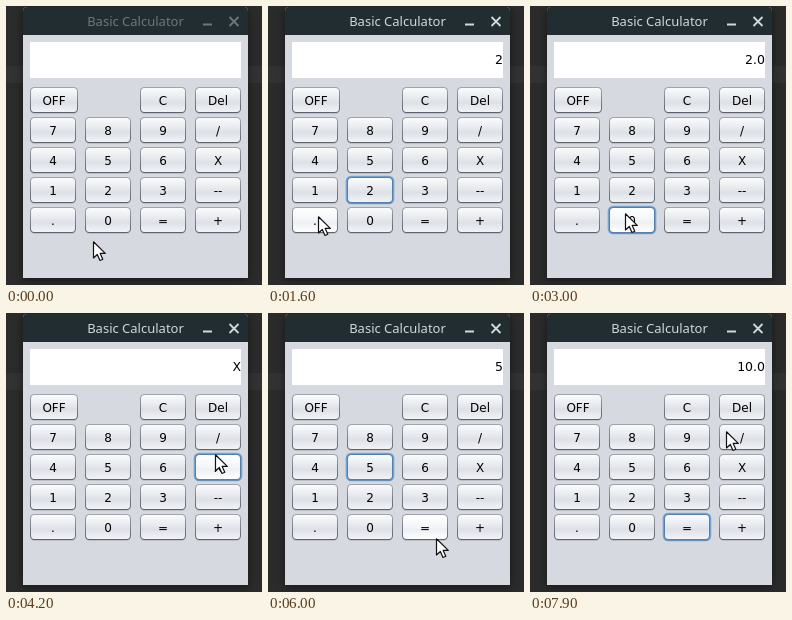
An HTML page that plays this animation: 256 by 279 pixels, repeating every 8000 ms.

```html
<!DOCTYPE html>
<html lang="en">
<head>
<meta charset="utf-8">
<title>Basic Calculator</title>
<style>
  html, body { margin: 0; width: 100%; height: 100%; overflow: hidden; background: #2b2b2b; }
  svg { display: block; width: 256px; height: 279px; }
  .label { font: 12px "DejaVu Sans", sans-serif; text-anchor: middle; }
  .display { font: 12.5px "DejaVu Sans", sans-serif; text-anchor: end; }
  .title { font: 500 13px "Noto Sans", sans-serif; text-anchor: middle; }
  .window { filter: drop-shadow(0 2px 4px rgba(0, 0, 0, .45)); }
</style>
</head>
<body>
<svg id="stage" viewBox="0 0 256 279">
  <defs>
    <linearGradient id="edge" x2="0" y2="1">
      <stop stop-color="#a0a4ad"/><stop offset="1" stop-color="#5c616b"/>
    </linearGradient>
    <linearGradient id="normal" x2="0" y2="1">
      <stop stop-color="#fafbfc"/><stop offset=".45" stop-color="#e6e8ed"/>
      <stop offset=".6" stop-color="#dde0e6"/><stop offset="1" stop-color="#f1f3f7"/>
    </linearGradient>
    <linearGradient id="hover" x2="0" y2="1">
      <stop stop-color="#ffffff"/><stop offset=".5" stop-color="#f3f5f8"/>
      <stop offset=".6" stop-color="#eceff3"/><stop offset="1" stop-color="#ffffff"/>
    </linearGradient>
    <linearGradient id="pressed" x2="0" y2="1">
      <stop stop-color="#a9b1bf"/><stop offset=".6" stop-color="#949eae"/>
      <stop offset="1" stop-color="#b3bbc9"/>
    </linearGradient>
  </defs>
  <rect width="256" height="279" fill="#2b2b2b"/>
  <rect y="60" width="256" height="17" fill="#323232"/>
  <g class="window">
    <path d="M17 272V5q0-4 4-4H238q4 0 4 4V272Z" fill="#d6d9df"/>
    <path d="M17 29V5q0-4 4-4H238q4 0 4 4V29Z" fill="#222d32"/>
  </g>
  <g id="caption">
    <text class="title" x="129.5" y="20">Basic Calculator</text>
    <path d="M197 18.5h9M223.5 11l9 9m0-9l-9 9" fill="none" stroke-width="1.8"/>
  </g>
  <rect x="24" y="36" width="211" height="36" fill="#fff"/>
  <text id="display" class="display" x="235" y="58"></text>
  <g id="keys"></g>
  <path id="cursor" d="M.5 .8V17L4.3 13.5 7 19.5 9.8 18.3 7.2 12.4H12.3Z" fill="#fff"
        stroke="#111" stroke-width="1.2" stroke-linejoin="round"/>
</svg>
<script>
const LOOP = 8000, STEP = 100;
const byId = id => document.getElementById(id);

function add(parent, tag, attrs, text = "") {
  const node = document.createElementNS("http://www.w3.org/2000/svg", tag);
  for (const name in attrs) node.setAttribute(name, attrs[name]);
  node.textContent = text;
  return parent.appendChild(node);
}

const rows = [["OFF", "", "C", "Del"], ["7", "8", "9", "/"], ["4", "5", "6", "X"],
  ["1", "2", "3", "--"], [".", "0", "=", "+"]];
const keys = [];
rows.forEach((row, r) => row.forEach((label, c) => {
  if (label) keys.push(makeKey(label, 24 + 55 * c, 81 + 30 * r, label === "OFF" ? 48 : 46));
}));

function makeKey(label, x, y, w, h = 26) {
  const group = add(byId("keys"), "g", {});
  const ring = add(group, "rect", { x: x - 1.3, y: y - 1.3, width: w + 2.6, height: h + 2.6, rx: 5.5, fill: "#73a4d1" });
  add(group, "rect", { x, y: y + 1, width: w, height: h, rx: 4.5, fill: "#000", opacity: .12 });
  const edge = add(group, "rect", { x, y, width: w, height: h, rx: 4.5 });
  const face = add(group, "rect", { x: x + 1, y: y + 1, width: w - 2, height: h - 2, rx: 3.5 });
  add(group, "text", { class: "label", x: x + w / 2, y: y + 18 }, label);
  return { label, x, y, w, h, ring, edge, face };
}

// Pointer moves: start, end, destination x, y
const moves = [
  [200, 600, 105, 193], [700, 900, 108, 186], [1200, 1600, 50, 210],
  [2100, 2400, 93, 208], [2500, 2600, 95, 207], [3200, 3600, 209, 141],
  [4200, 4600, 100, 146], [5400, 5700, 200, 206], [5700, 5800, 196, 214],
  [5800, 5900, 177, 226], [5900, 6000, 168, 225], [6000, 6200, 160, 216],
  [6900, 7100, 173, 138], [7100, 7200, 175, 92], [7200, 7400, 200, 63],
  [7400, 7700, 166, 173], [7700, 7800, 162, 178], [7800, 7900, 196, 118]
];

// Clicks: time, key, resulting display
const clicks = [[1100, "2", "2"], [1900, ".", "2."], [2800, "0", "2.0"],
  [4000, "X", "X"], [4900, "5", "5"], [6400, "=", "10.0"]];

function pointerAt(t) {
  let x = 87, y = 235;
  for (const [start, end, toX, toY] of moves) {
    if (t <= start) break;
    const p = Math.min(1, (t - start) / (end - start));
    const eased = 1 - (1 - p) ** 2;
    x += (toX - x) * eased;
    y += (toY - y) * eased;
  }
  return { x: Math.round(x), y: Math.round(y) };
}

const contains = (key, p) => p.x >= key.x && p.x < key.x + key.w && p.y >= key.y && p.y < key.y + key.h;
const latest = t => clicks.filter(click => click[0] <= t).pop() || [];

function render(time) {
  const t = Math.floor((time % LOOP) / STEP) * STEP;
  const now = pointerAt(t), before = pointerAt(t - STEP);
  const [pressTime, pressKey] = latest(t);
  const focusKey = latest(t - STEP)[1];
  const tint = t >= clicks[0][0] ? "#d0d8db" : "#6d787c";

  byId("caption").setAttribute("fill", tint);
  byId("caption").setAttribute("stroke", "none");
  byId("caption").lastElementChild.setAttribute("stroke", tint);
  byId("display").textContent = latest(t - 2 * STEP)[2] || "";
  byId("cursor").setAttribute("transform", `translate(${now.x} ${now.y})`);

  for (const key of keys) {
    const pressed = key.label === pressKey && t < pressTime + 2 * STEP;
    const hovered = contains(key, now) && contains(key, before);
    const focused = key.label === focusKey;
    key.face.setAttribute("fill", `url(#${pressed ? "pressed" : hovered ? "hover" : "normal"})`);
    key.edge.setAttribute("fill", focused ? "#5580ad" : "url(#edge)");
    key.ring.setAttribute("visibility", focused ? "visible" : "hidden");
  }
}

const began = performance.now();
function tick() {
  render(performance.now() - began);
  requestAnimationFrame(tick);
}
tick();
</script>
</body>
</html>
```
